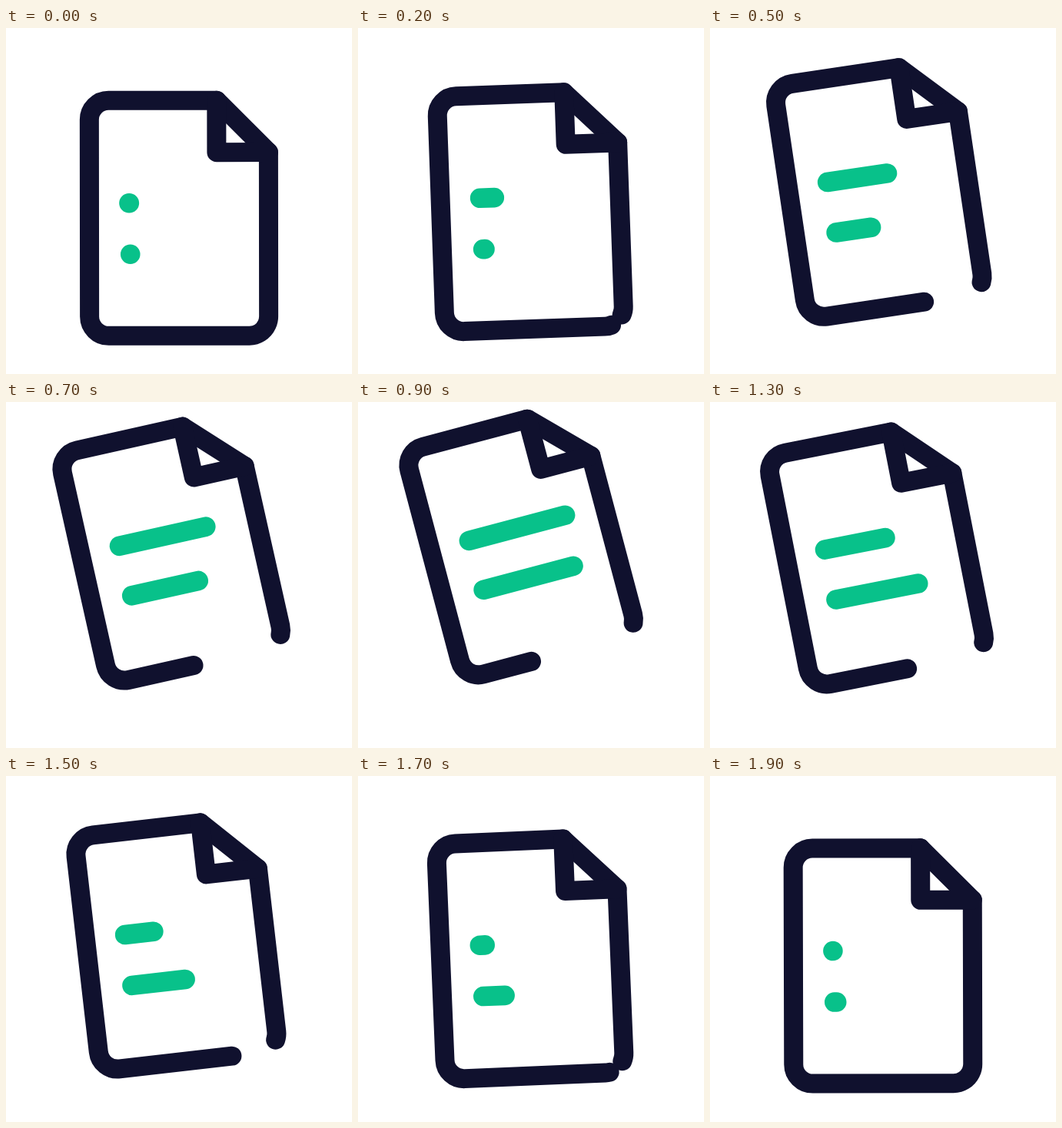
An HTML page that plays this animation: 450x450 px, repeating every 2000 ms.

```html
<!DOCTYPE html>
<html lang="en">
<head>
<meta charset="utf-8">
<title>Document icon</title>
<style>
  html, body { margin: 0; width: 100%; height: 100%; overflow: hidden; background: #fff; }
  svg { display: block; width: 100%; height: 100%; }
  path { fill: none; stroke-width: 25; stroke-linecap: round; stroke-linejoin: round; }
  .ink { stroke: #10112e; }
  .text { stroke: #08c18a; stroke-width: 25.6; }
</style>
</head>
<body>
<svg viewBox="0 0 450 450">
  <g id="doc">
    <path id="outline" class="ink" d="M339.1 386.1A25 25 0 0 0 341.5 375.5V162L274 94.5H133.5A25 25 0 0 0 108.5 119.5V375.5A25 25 0 0 0 133.5 400.5H316.5A25 25 0 0 0 339.1 386.1"/>
    <path class="ink" d="M274 94.5V162H341.5"/>
    <path id="line1" class="text"/>
    <path id="line2" class="text"/>
  </g>
</svg>
<script>
const LOOP = 2000, STEP = 100;
const TILT = 15, GAP = 148.5, LINE = 129.5, PULSE = 1870;
const PIVOT = '-30 264';

const [doc, outline, line1, line2] =
  ['doc', 'outline', 'line1', 'line2'].map(id => document.getElementById(id));
const total = outline.getTotalLength();

// Cosine bump of the given width, 1 at its peak and 0 outside
function bump(t, peak, width) {
  const d = Math.abs(t - peak);
  const near = Math.min(d, LOOP - d, width / 2);
  return (1 + Math.cos(2 * Math.PI * near / width)) / 2;
}

function drawLine(el, x, y, amount) {
  el.setAttribute('d', `M${x} ${y}h${(0.01 + LINE * amount).toFixed(2)}`);
}

function render(time) {
  const t = Math.floor(time % LOOP / STEP) * STEP;
  const open = bump(t, 960, LOOP);
  doc.setAttribute('transform', `rotate(${-TILT * open} ${PIVOT})`);
  outline.setAttribute('stroke-dasharray', `${total - GAP * open} ${total}`);
  drawLine(line1, 160, 228, bump(t, 903, PULSE));
  drawLine(line2, 161.7, 294.5, bump(t, 1055, PULSE));
}

const start = performance.now();
function tick() {
  render(performance.now() - start);
  requestAnimationFrame(tick);
}
tick();
</script>
</body>
</html>
```
